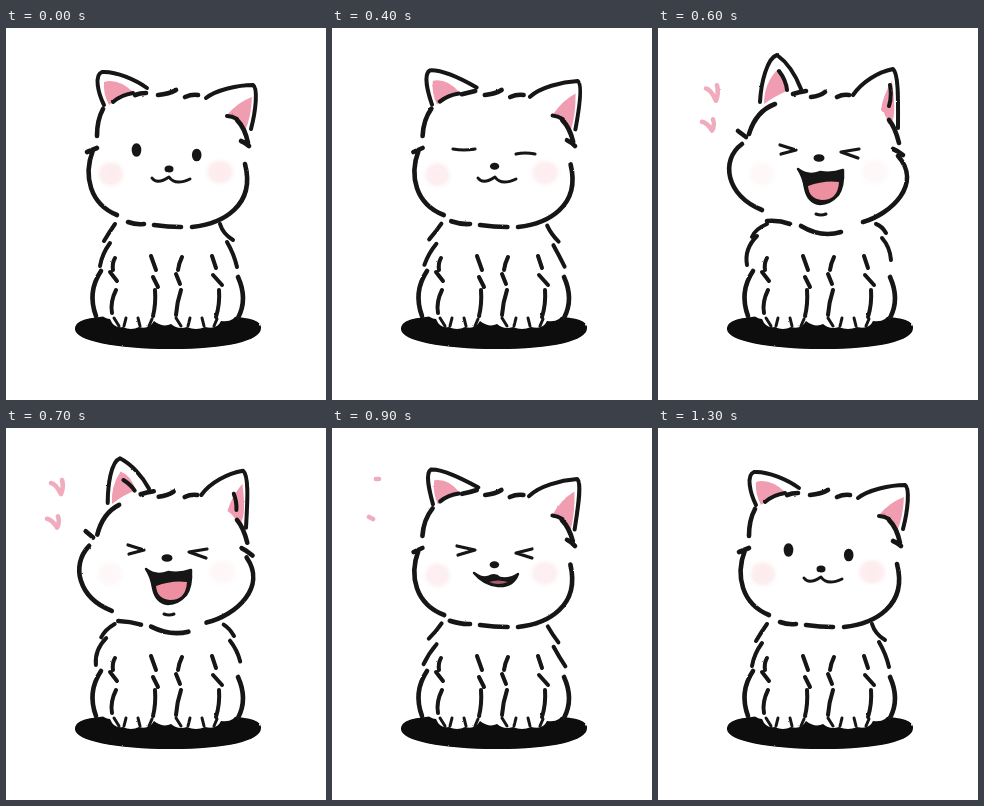
An HTML page that plays this animation: 320 px wide and 372 px high, repeating every 1400 ms.

```html
<!DOCTYPE html>
<html lang="en">
<head>
<meta charset="utf-8">
<title>Laughing kitten</title>
<style>
html, body { margin: 0; width: 100%; height: 100%; overflow: hidden; background: #fff; }
svg { display: block; width: 100vw; height: 100vh; }
.ink { fill: none; stroke: #141414; stroke-width: 4; stroke-linecap: round; stroke-linejoin: round; }
.bold { stroke-width: 4.6; }
.thin { stroke-width: 3; }
.solid { fill: #141414; }
.pink { fill: #f09db2; }
.heart { fill: none; stroke: #f0abbd; stroke-width: 4.6; stroke-linecap: round; stroke-linejoin: round; }
</style>
</head>
<body>
<svg viewBox="0 0 320 372">
  <defs>
    <filter id="crayon" x="0" y="0" width="320" height="372" filterUnits="userSpaceOnUse">
      <feTurbulence type="fractalNoise" baseFrequency=".25" numOctaves="2" seed="4"/>
      <feDisplacementMap in="SourceGraphic" scale="1.6" xChannelSelector="R" yChannelSelector="G"/>
    </filter>
    <radialGradient id="glow">
      <stop offset="0" stop-color="#fdebee"/>
      <stop offset=".6" stop-color="#fdeef0"/>
      <stop offset="1" stop-color="#fff" stop-opacity="0"/>
    </radialGradient>
  </defs>
  <ellipse id="blushL" rx="17" ry="16" fill="url(#glow)"/>
  <ellipse id="blushR" rx="18" ry="16" fill="url(#glow)"/>
  <g filter="url(#crayon)">
    <path fill="#070707" d="M69 301C69 289 92 287 162 287S255 289 255 300C255 313 220 321 165 321S69 313 69 301Z"/>
    <path fill="#fff" d="M91 268Q91 290 104 291Q108 301 117 299Q125 303 133 299Q143 302 148 293Q157 300 165 296Q172 302 181 299Q190 303 199 299Q211 302 215 293Q228 295 232 284V268Z"/>
    <path class="ink bold" d="M95 243Q81 264 90 288M232 249Q242 271 232 290"/>
    <path class="ink" d="M109 230Q106 235 107 242M104 244L111 253M110 262Q104 274 106 285
      M145 228L150 242M147 249L152 259M149 262Q150 276 147 288
      M176 229Q173 235 172 242M170 246L174 256M175 262Q171 274 170 287
      M206 228L210 240M207 247L216 257M213 262Q214 276 210 289"/>
    <path class="ink thin" d="M108 290L113 298M120 290L118 298M132 290L134 298M146 291L143 298M170 290L175 298M184 290L182 298M196 290L198 298M211 291L208 298"/>
    <path id="pinkL" class="pink"/>
    <path id="pinkR" class="pink"/>
    <path id="ears" class="ink"/>
    <path id="head" class="ink bold"/>
    <path id="shoulders" class="ink"/>
    <path id="eyes" class="ink"/>
    <path id="nose" class="solid"/>
    <path id="mouth" class="ink thin"/>
    <path id="tongue"/>
    <path id="lip" class="ink thin"/>
    <path id="heart1" class="heart"/>
    <path id="heart2" class="heart"/>
  </g>
</svg>
<script>
const LOOP = 1400;

// All poses share one command layout, so any two can be blended.
const calm = {
  pinkL: "M98 54Q112 50 127 64Q112 69 103 77Q97 66 98 54Z",
  pinkR: "M246 69Q232 74 221 87Q233 92 239 103Q245 90 246 69Z",
  ears: "M98 77C92 65 88 47 96 44C110 43 130 52 141 60M107 74Q115 67 127 65M200 70C210 62 232 57 247 57C252 60 250 82 245 101M221 88Q226 88 231 91",
  head: "M129 67Q134 65 140 65M152 67Q163 66 170 62M179 69Q186 66 192 67M97 81Q91 92 91 108M81 124L91 120M87 122C77 148 84 176 111 187M122 194Q130 197 138 196M148 197Q162 199 175 199M186 199C216 196 250 178 239 136M231 92Q239 100 242 115M235 113Q240 115 243 118",
  shoulders: "M109 196Q104 203 98 213M104 215Q96 226 94 238M214 196Q217 206 227 212M221 214Q228 226 231 239",
  blush: "105 146 214 144 1", nose: "163 141 4.5 3.5"
};
const smiling = {
  pinkL: "M105 51Q119 50 127 64Q115 68 108 76Q103 65 105 51Z",
  pinkR: "M240 60Q227 70 220 87Q231 92 238 103Q242 82 240 60Z",
  ears: "M103 76C101 62 96 44 101 40C112 40 130 50 150 59M109 73Q117 67 127 66M195 67C204 56 226 49 244 47C249 52 243 80 241 102M220 87Q225 88 230 91",
  head: "M131 65Q140 64 148 60M154 67Q163 66 169 62M177 69Q184 66 191 67M103 80Q92 91 90 108M82 124L90 120M86 123C77 148 83 176 113 187M115 192Q128 196 138 196M148 197Q162 199 176 199M186 199C216 196 247 178 238 137M229 92Q236 99 240 112M235 111Q240 114 243 118",
  shoulders: "M110 195Q105 203 96 209M105 217Q97 225 90 235M217 200Q222 206 226 216M222 222Q227 232 235 238",
  blush: "106 148 212 146 .8", nose: "162 134 5 3.5"
};
const laughing = {
  pinkL: "M119 42Q128 47 131 62Q117 68 106 76Q106 56 119 42Z",
  pinkR: "M234 53Q225 67 223 82Q229 88 230 96Q240 97 234 53Z",
  ears: "M102 74C103 55 109 30 119 27C130 35 138 48 143 61M121 43Q128 52 129 62M195 67C204 54 220 44 235 41C241 46 240 76 240 100M232 57Q234 69 231 78",
  head: "M135 66Q141 64 148 63M153 69Q162 68 167 64M179 69Q185 66 191 67M117 76Q98 83 91 106M80 103L88 109M84 116C62 132 68 168 104 182M109 193Q121 192 132 196M143 198Q163 210 183 204M205 194C233 186 265 156 240 128M231 92Q237 99 241 115M235 121Q240 123 245 127",
  shoulders: "M109 196Q97 201 94 209M99 208Q86 221 89 237M218 196Q224 198 228 205M224 210Q232 219 233 232",
  blush: "104 146 217 144 .4", nose: "161 130 5.5 3.8"
};
const settling = {
  pinkL: "M104 47Q118 48 127 62Q113 68 106 76Q101 65 104 47Z",
  pinkR: "M242 62Q228 70 218 85Q230 89 237 99Q244 84 242 62Z",
  ears: "M101 77C99 64 95 42 102 38C115 39 133 49 143 60M109 73Q117 67 128 64M196 67C204 56 225 49 242 47C249 52 244 80 240 99M218 86Q224 87 229 91",
  head: "M134 67Q140 65 147 64M152 68Q162 67 169 63M178 69Q185 66 192 67M104 79Q94 90 92 108M79 104L85 111M81 122C70 150 83 174 110 185M120 193Q131 197 142 198M150 200Q167 204 181 203M190 196C224 191 252 166 242 133M231 92Q238 99 242 114M237 118Q243 122 250 129",
  shoulders: "M108 196Q104 203 98 210M103 215Q94 224 92 237M217 198Q222 205 228 215M224 219Q230 229 237 237",
  blush: "104 146 215 144 .5", nose: "161 130 5.5 3.8"
};

const dot = (x, y, rx, ry) =>
  `M${x - rx} ${y}a${rx} ${ry} 0 1 0 ${2 * rx} 0a${rx} ${ry} 0 1 0 ${-2 * rx} 0Z`;

const eyeShapes = {
  open: dot(130.5, 122, 2.8, 4.8) + dot(190.7, 127, 2.8, 4.3),
  shut: "M121 121Q132 123 143 121M184 126Q193 124 203 126",
  squint: "M122 117L138 122L123 126M201 121L183 124L200 130",
  soft: "M125 118L143 122L126 127M200 121L184 125L200 130"
};
const mouths = {
  calm: { d: "M146 150Q151 157 163 149Q169 158 184 151" },
  smile: {
    d: "M142 145Q150 151 156 149Q163 145 168 150Q177 152 186 146Q181 159 166 158Q152 157 142 145Z",
    tongue: "M157 154Q166 151 176 154Q166 158 157 154Z", tint: "#a85c69"
  },
  laugh: {
    d: "M140 141Q150 149 162 144Q174 146 185 142Q186 158 180 167Q172 176 162 176Q150 175 147 160Q145 148 140 141Z",
    tongue: "M150 158Q166 152 181 154Q180 172 164 172Q151 171 150 158Z",
    lip: "M158 186Q163 188 168 186"
  },
  grin: {
    d: "M140 142Q151 149 162 144Q174 146 186 142Q183 154 178 159Q172 164 163 163Q152 162 147 155Z",
    tongue: "M153 155Q166 151 179 153Q176 161 164 160Q155 160 153 155Z",
    lip: "M158 171Q163 178 169 171"
  }
};

const numbers = /\d*\.?\d+/g;
function blend(a, b, k) {
  const pose = {};
  for (const key in a) {
    const to = b[key].match(numbers);
    let i = 0;
    pose[key] = a[key].replace(numbers, n => (+n + (to[i++] - n) * k).toFixed(2));
  }
  return pose;
}

const heart = (x, y, w, h) =>
  `M${x - 6 * w} ${y - 4 * h}Q${x - w} ${y - 3 * h} ${x + 4 * w} ${y + 7 * h}Q${x + 7 * w} ${y} ${x + 5 * w} ${y - 7 * h}`;

const steps = [
  { at: 0, pose: calm, eyes: "open", mouth: "calm" },
  { at: 400, pose: blend(calm, smiling, .4), eyes: "shut", mouth: "calm" },
  { at: 500, pose: smiling, eyes: "shut", mouth: "smile", hearts: ["M60 73L64 79", "M62 106L66 109"] },
  { at: 600, pose: laughing, eyes: "squint", mouth: "laugh", hearts: [heart(54, 65, 1, 1.1), heart(50, 97, 1, .8)] },
  { at: 700, pose: blend(laughing, settling, .3), eyes: "squint", mouth: "laugh", hearts: [heart(51, 59, 1, 1), heart(47, 94, 1, .8)] },
  { at: 800, pose: settling, eyes: "squint", mouth: "grin", hearts: [heart(49, 54, 1.1, .9), heart(45, 91, 1, .8)] },
  { at: 900, pose: blend(calm, smiling, .6), eyes: "soft", mouth: "smile", hearts: ["M44 51L47 51", "M37 89L41 91"] },
  { at: 1100, pose: blend(calm, smiling, .4), eyes: "shut", mouth: "smile" },
  { at: 1200, pose: blend(calm, smiling, .15), eyes: "shut", mouth: "calm" },
  { at: 1300, pose: calm, eyes: "open", mouth: "calm" }
];

const el = id => document.getElementById(id);
const set = (id, attrs) => {
  for (const name in attrs) el(id).setAttribute(name, attrs[name]);
};

let shown;
function draw(time) {
  const t = time % LOOP;
  const step = steps.filter(s => s.at <= t).pop();
  if (step === shown) return;
  shown = step;
  const { pose, eyes, hearts = ["", ""] } = step;
  const mouth = mouths[step.mouth];

  for (const id of ["pinkL", "pinkR", "ears", "head", "shoulders"]) set(id, { d: pose[id] });
  const [lx, ly, rx, ry, opacity] = pose.blush.split(" ");
  set("blushL", { cx: lx, cy: ly, opacity });
  set("blushR", { cx: rx, cy: ry, opacity });
  set("nose", { d: dot(...pose.nose.split(" ").map(Number)) });
  set("eyes", { d: eyeShapes[eyes], style: eyes === "open" ? "fill:#141414" : "stroke-width:3.2" });
  set("mouth", { d: mouth.d, style: mouth.tongue ? "fill:#141414;stroke-width:2.4" : "" });
  set("tongue", { d: mouth.tongue || "", fill: mouth.tint || "#ee8fa0" });
  set("lip", { d: mouth.lip || "" });
  set("heart1", { d: hearts[0] });
  set("heart2", { d: hearts[1] });
}

const start = performance.now();
function tick() {
  draw(performance.now() - start);
  requestAnimationFrame(tick);
}
tick();
</script>
</body>
</html>
```
